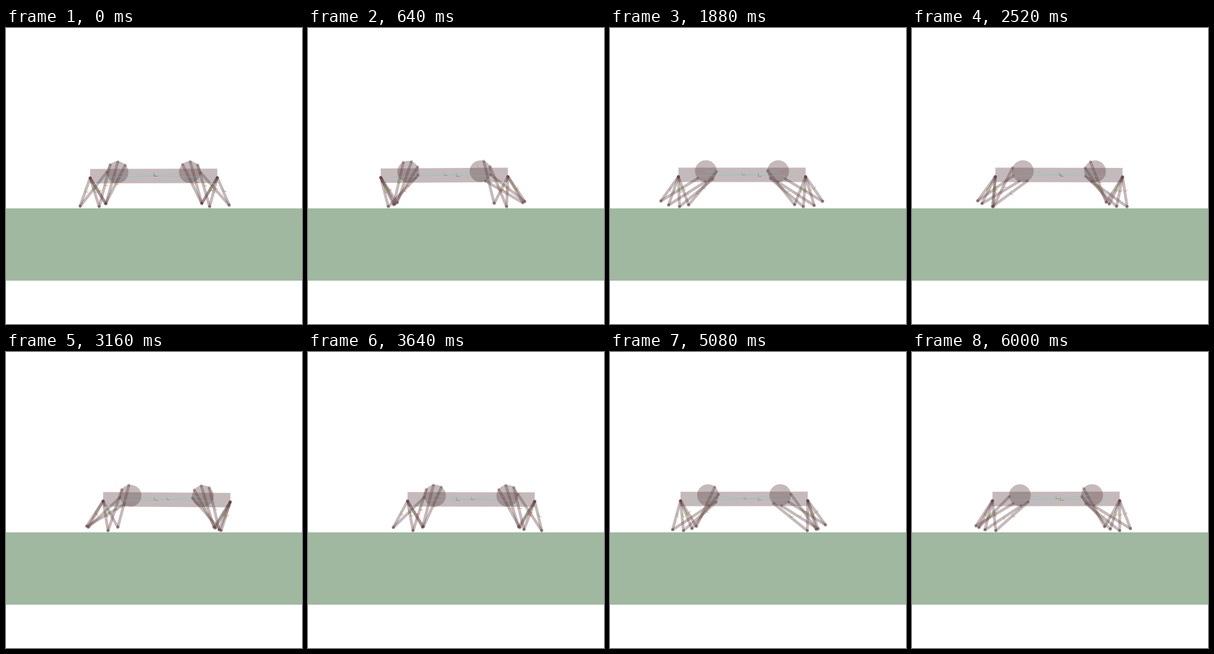
An HTML page with a canvas for the animation above (6410 ms loop, 512x512 px).

```html
<!DOCTYPE html>
<html>
<head>
<meta charset="utf-8">
<style>
  html, body { margin: 0; width: 100%; height: 100%; overflow: hidden; background: #fff; }
  canvas { display: block; width: 512px; height: 512px; }
</style>
</head>
<body>
<canvas id="stage" width="512" height="512"></canvas>
<script>
const ctx = document.getElementById('stage').getContext('2d');
const LOOP = 6410, STEP = 40, LAST = 6000;
const RAD = Math.PI / 180;
const ARM = 52.3, ROD = 75.5, CRANK = 18.5, GROUND = 309.2;
const HIP = { x: 110, y: 3 }, WHEEL = { x: 62.5, y: -6.5 };
const SKIN = 'rgba(96,64,68,.36)', EDGE = 'rgba(96,64,68,.22)';
const RED = 'rgba(245,50,50,.8)', GREEN = 'rgba(40,215,40,.85)', CYAN = 'rgba(95,205,205,.7)';

// Chassis centre over time: [seconds, x]
const track = [
  [0, 255.5], [.25, 249.5], [.68, 234.5], [1, 225.4], [1.24, 220], [1.5, 217.8],
  [1.7, 221.8], [2.04, 234.8], [2.52, 254.2], [2.72, 263], [3.16, 278], [3.4, 282.5],
  [3.55, 283.3], [3.85, 278], [4.16, 267], [4.76, 241.5], [5.08, 232], [5.25, 230.2],
  [5.44, 231], [5.6, 234.5], [6, 249.2]
];

function slope(i) {
  const a = track[Math.max(0, i - 1)], b = track[Math.min(track.length - 1, i + 1)];
  return (b[1] - a[1]) / (b[0] - a[0]);
}

function bodyX(t) {
  let i = 0;
  while (i < track.length - 2 && t > track[i + 1][0]) i++;
  const [t0, x0] = track[i], [t1, x1] = track[i + 1];
  const d = t1 - t0, u = (t - t0) / d, v = 1 - u;
  return x0 * v * v * (1 + 2 * u) + x1 * u * u * (3 - 2 * u)
    + d * u * v * (slope(i) * v - slope(i + 1) * u);
}

// Joint positions of one leg; side is -1 (left) or 1 (right)
function leg(side, deg) {
  const hip = { x: side * HIP.x, y: HIP.y };
  const pin = {
    x: side * WHEEL.x + CRANK * Math.cos(deg * RAD),
    y: WHEEL.y - CRANK * Math.sin(deg * RAD)
  };
  const dx = (pin.x - hip.x) * -side, dy = pin.y - hip.y;
  const dist = Math.hypot(dx, dy);
  const bend = Math.acos((ARM * ARM + dist * dist - ROD * ROD) / (2 * ARM * dist));
  const a = Math.atan2(dy, dx) + bend;
  return { hip, pin, foot: { x: hip.x - side * ARM * Math.cos(a), y: hip.y + ARM * Math.sin(a) } };
}

function legs(side, turn) {
  const first = side < 0 ? 45 : 0;
  return [0, 45, 90, 135].map(d => leg(side, first + d + turn));
}

const angle = (a, b) => Math.atan2(b.y - a.y, b.x - a.x);
const middle = (a, b) => ({ x: (a.x + b.x) / 2, y: (a.y + b.y) / 2 });

function line(a, b, color, width = .7) {
  ctx.strokeStyle = color;
  ctx.lineWidth = width;
  ctx.beginPath();
  ctx.moveTo(a.x, a.y);
  ctx.lineTo(b.x, b.y);
  ctx.stroke();
}

function disc(p, r) {
  ctx.fillStyle = SKIN;
  ctx.beginPath();
  ctx.arc(p.x, p.y, r, 0, 7);
  ctx.fill();
}

function bar(a, b) {
  ctx.save();
  ctx.translate(a.x, a.y);
  ctx.rotate(angle(a, b));
  const len = Math.hypot(b.x - a.x, b.y - a.y);
  ctx.fillStyle = SKIN;
  ctx.fillRect(0, -2.2, len, 4.4);
  ctx.strokeStyle = EDGE;
  ctx.lineWidth = .6;
  ctx.strokeRect(0, -2.2, len, 4.4);
  ctx.restore();
  disc(a, 2.5);
  disc(b, 2.5);
}

function axes(p, rot, size = 5.5) {
  const c = Math.cos(rot) * size, s = Math.sin(rot) * size;
  line(p, { x: p.x + c, y: p.y + s }, RED);
  line(p, { x: p.x + s, y: p.y - c }, GREEN);
}

const rest = { '-1': legs(-1, 0), '1': legs(1, 0) };

function draw(t) {
  const turn = -2 - 96 * t;
  const sides = [-1, 1].map(side => ({ side, legs: legs(side, turn) }));
  const [left, right] = sides.map(s => GROUND - Math.max(...s.legs.map(l => l.foot.y)));

  ctx.clearRect(0, 0, 512, 512);
  ctx.fillStyle = '#9fb89f';
  ctx.fillRect(0, 312, 512, 125);
  axes({ x: 256.5, y: 256.5 }, 0);

  ctx.save();
  ctx.translate(bodyX(t), (left + right) / 2);
  ctx.rotate(Math.atan2(right - left, 2 * HIP.x));
  ctx.fillStyle = SKIN;
  ctx.fillRect(-110, -12.5, 220, 25);

  for (const s of sides) {
    disc({ x: s.side * WHEEL.x, y: WHEEL.y }, 18.8);
    for (const l of s.legs) {
      bar(l.hip, l.foot);
      bar(l.pin, l.foot);
    }
  }

  const centre = { x: 0, y: 0 };
  for (const s of sides) {
    const hub = { x: s.side * WHEEL.x, y: WHEEL.y };
    line(centre, hub, CYAN, .5);
    line(centre, { x: s.side * 88, y: 2.4 }, CYAN);
    s.legs.forEach((l, i) => {
      const r = rest[s.side][i];
      line(hub, l.pin, 'rgba(95,205,205,.22)', .5);
      axes(middle(l.hip, l.foot), angle(l.hip, l.foot) - angle(r.hip, r.foot));
      axes(middle(l.pin, l.foot), angle(l.pin, l.foot) - angle(r.pin, r.foot));
    });
  }
  const a = (turn + 180) * RAD;
  line({ x: WHEEL.x, y: WHEEL.y },
    { x: WHEEL.x + 18 * Math.cos(a), y: WHEEL.y - 18 * Math.sin(a) }, 'rgba(230,80,80,.5)', .6);
  axes(centre, 0, 5);
  ctx.restore();
}

function tick() {
  const ms = performance.now() % LOOP;
  draw(Math.min(LAST, Math.floor(ms / STEP) * STEP) / 1000);
  requestAnimationFrame(tick);
}
tick();
</script>
</body>
</html>
```
